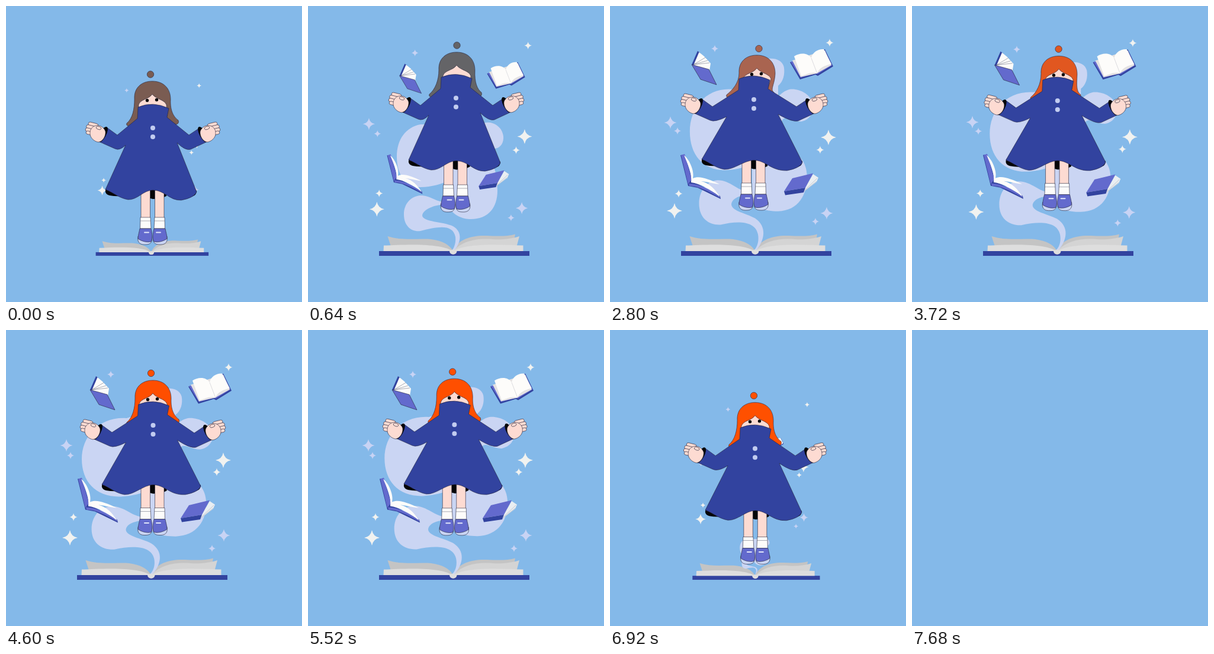
Write an HTML page that moves like this. It is 500 px wide and 500 px high and loops after 7720 ms.

```html
<!DOCTYPE html>
<html lang="en">
<head>
<meta charset="utf-8">
<title>Floating reader</title>
<style>
  html, body { margin: 0; width: 100%; height: 100%; overflow: hidden; background: #84b9e9; }
  svg { display: block; width: 100vw; height: 100vh; }
  .ink { stroke: #23233a; stroke-width: .6; stroke-linejoin: round; }
  .skin { fill: #fddbd2; }
  .lilac { fill: #cad5f3; }
  .navy { fill: #32439f; }
  .violet { fill: #636acd; }
  .white { fill: #fdfcfa; }
  .black { fill: #050507; }
  .line { fill: none; stroke: #55586e; stroke-width: .5; }
</style>
</head>
<body>
<svg viewBox="0 0 500 500">
  <defs>
    <path id="star" d="M0 -1Q.16 -.16 1 0Q.16 .16 0 1Q-.16 .16 -1 0Q-.16 -.16 0 -1Z"/>
    <g id="hand">
      <ellipse class="black" cx="163.5" cy="217" rx="5.5" ry="14.5" transform="rotate(28 163.5 217)"/>
      <g class="skin ink">
        <rect x="139" y="197.5" width="17" height="6" rx="3" transform="rotate(14 148 200)"/>
        <rect x="135.5" y="202" width="17" height="6" rx="3" transform="rotate(14 144 205)"/>
        <rect x="134" y="207" width="17" height="6" rx="3" transform="rotate(14 142 210)"/>
        <rect x="135" y="212" width="15" height="5.5" rx="2.7" transform="rotate(14 142 215)"/>
        <path d="M149 203C157 199 166 205 168 212C169 220 163 229 156 230C149 229 141 222 142 214C142 209 145 205 149 203Z"/>
        <ellipse cx="156.5" cy="206" rx="4.5" ry="2.6" transform="rotate(20 156.5 206)"/>
      </g>
    </g>
    <g id="leg">
      <rect class="skin ink" x="228" y="285" width="15.5" height="75"/>
      <path class="white ink" d="M227 357H244L245 376H226.500Z"/>
      <path class="line" d="M227 363H244.500"/>
      <path class="lilac ink" d="M223 389C221 401 228 403.500 236 403C244 403 248 399 246 389Z"/>
      <path class="violet ink" d="M226 376H245C247 385 248 393 245 398C238 400 228 397 223 393C223 387 225 382 226 376Z"/>
      <rect x="233" y="381.500" width="9" height="2" rx="1" fill="#e3e7fb"/>
    </g>
  </defs>

  <g id="scene">
    <g id="tome">
      <rect class="navy" x="120" y="414" width="254" height="8"/>
      <path fill="#c4c4c4" d="M134.500 389C160 397 186 392 208 394C228 397 239 403 245 414L140 406Z"/>
      <path fill="#c4c4c4" d="M245 413C254 394 276 387 302 388C322 389 338 389 350 385.500L347 402Z"/>
      <path fill="#d4d4d4" d="M245 414C262 396 286 392 312 394C330 395 345 393 357 389L352 408Z"/>
      <path fill="#dedede" d="M128 404.500C165 403 222 400 245 414H127.500ZM245 414C268 400 325 403 363.500 404.500V414Z"/>
    </g>
    <path id="smoke" class="lilac"/>
    <path id="spine" fill="#dedede" d="M239 414Q245 409 251.500 414C251 421.500 239.500 421.500 239 414Z"/>
    <g id="stars"></g>
    <g id="books">
      <g>
        <path class="navy" d="M142 101L152 78L156 81L147 104Z"/>
        <path class="white" d="M145 102L154.500 80L163 87L174 99L172 111Z"/>
        <path class="line" d="M145 101L165 89M145 101L169 94M145 101L172 98"/>
        <path class="violet ink" d="M142 101L171 109L184 135L157 126Z"/>
      </g>
      <g>
        <path class="navy" d="M310 97L327 126L353 118L357 120L383 104L369 75L350 90Z"/>
        <path class="violet" d="M311 96L328 123L353 116L357 117L381 102L369 77L350 90Z"/>
        <path fill="#e4e2e2" d="M314 94L328 122L355 116L380 102L369 77Z"/>
        <path class="white" d="M317 87C327 80 341 81 346 90L356 116C346 112 338 118 329 120ZM346 90C348 79 359 74 367 75L380 100C370 102 359 106 356 116Z"/>
        <path class="line" d="M346 90L356 116" opacity=".4"/>
      </g>
      <g>
        <path class="navy" d="M118 254L131 306L147 309L186 328L185 323L139 298L125 253Z"/>
        <path class="violet" d="M119 254L125 252L137 295L131 303Z"/>
        <path class="white" d="M124 254C134 262 142 282 139 293C150 288 165 294 184 303C172 302 160 298 153 298C167 301 177 312 185 325C168 310 150 302 136 300C138 286 130 268 124 254Z"/>
        <path class="violet" d="M132 302C150 302 168 312 184 324L185 326C165 315 149 306 133 306Z"/>
      </g>
      <g>
        <path fill="#e9eef2" d="M329 308L343 284L352 290L349 297L327 314Z"/>
        <path class="line" d="M329 311L350 291M328 313L349 296" opacity=".5"/>
        <path class="violet" d="M294 313L308 291L343 282.500L330 307Z"/>
        <path class="navy" d="M294 313L330 307L327 315L296 319.500Z"/>
      </g>
    </g>

    <circle id="bun" class="ink" cx="244" cy="115.500" r="5.700"/>
    <path id="hair" class="ink"/>
    <path id="face" class="skin ink"/>
    <g id="eyes" class="black"><ellipse cx="238.500" cy="159.500" rx="2.700" ry="2.700"/><ellipse cx="254.500" cy="158.500" rx="2.700" ry="2.700"/></g>
    <path id="lining" class="black"/>
    <g id="legs"><use href="#leg"/><use href="#leg" transform="matrix(-1 0 0 1 495 0)"/></g>
    <path id="coat" class="navy ink"/>
    <g id="buttons" fill="#c2ccf0"><circle cx="248" cy="206" r="4"/><circle cx="248" cy="221" r="4"/></g>
    <use id="handL" href="#hand"/>
    <g id="handR"><use href="#hand" transform="matrix(-1 0 0 1 496 0)"/></g>
  </g>
</svg>

<script>
const LOOP = 7720, STEP = 40, END = 7680;
const $ = id => document.getElementById(id);
const TIMES = [0, 640, 1600, 2800, 4600, 5700, 6320, 7240, 7640];

// Offsets at each of TIMES: x list, y list.
const anchors = {
  t: [[0, 2, 1.5, -5, .5, -1, -3, -3, -3], [0, -50.5, -55, -48, -45, -46, -21.5, 4, 26]],
  a: [[0, 2, -2, -15, -9, -8, -9, -10, -10], [0, -50, -55, -48, -45, -46, -21, 4, 26]],
  b: [[0, 3, 6, 6, 9, 8, 4, 4, 4], [0, -50, -55, -48, -44, -46, -21, 4, 26]],
  l: [[0, 2, -2, -13, -6, -6, -7, -7, -7], [0, -50, -54, -51, -49, -50, -22, 4, 26]],
  r: [[0, 3, 5, 3, 7, 6, 2, 2, 2], [0, -49, -53, -50, -50, -50, -23, 4, 26]],
  f: [[0, 1.5, 1, -5, 0, -1, -2.5, -2, -2], [0, -55, -55.5, -58, -56.5, -56, -25, 3, 26]],
  h: [[0, 4, 6, 1, 1, 0, -2, -2, -2], [0, -49, -52, -44, -42, -45, -18.5, 4, 26]],
  n: [[0, 7.5, 12.5, 7.5, 1, 0, -1, -1, -1], [0, -49, -52, -43.5, -42.5, -45, -18.5, 4, 26]],
  p: [[0, 1, 0, -7, 0, -1, -3, -3, -3], [0, -49, -56, -48, -42, -45, -18, 4, 26]],
  q: [[0, 2, -2, -14, 1, 0, -2, -2, -2], [0, -47, -55, -47, -42, -45, -19, 4, 26]]
};

const tracks = {
  tome: [.75, 1, 1, 1, 1, 1, .92, .8, .7],
  stars: [.615, .96, 1, 1, 1, 1, .78, .62, .55],
  books: [.2, .88, 1, 1, 1, 1, .69, .2, .1],
  grow: [0, 1, 1, 1, 1, 1, 1, 0, 0],
  morph: [0, 0, 1, 1, 1, 1, 0, 0, 0],
  wide: [1, 1, 1, .975, 1.035, 1.02, 1, 1, 1],
  tall: [1, 1, 1, .99, .96, .97, 1, 1, 1]
};

const hairKeys = [[122, 92, 82], [100, 100, 103], [102, 106, 108], [169, 100, 80],
  [255, 78, 0], [255, 79, 0], [255, 80, 0], [255, 80, 0], [255, 80, 0]];

// Each moving item: positions at 1600, 2800 and 4600 ms.
const starRows = [
  [0, 13, 371, 219, 369, 222, 367, 220], [0, 6.5, 356, 243, 355, 243, 356, 240],
  [0, 6.5, 377, 59, 371, 62, 376, 63], [1, 6, 178, 72, 177, 72, 177, 75],
  [1, 10.5, 97, 197, 102, 197, 102, 195], [1, 6, 112, 214, 114, 211, 109, 212],
  [0, 6.5, 115, 319, 116, 317, 114, 316], [0, 13, 111, 347, 109, 346, 108, 351],
  [1, 10.5, 366, 345, 366, 350, 368, 347], [1, 6, 347, 362, 347, 364, 348, 369]
];
const bookRows = [
  [0, 0, -4, -2, 0, 0], [0, 0, -6, -2, -2, -1.5],
  [0, 0, 1, -2, 3, -2.5], [0, 0, 0, 0, 1, 5]
];

const smokeLow = `M247 413C258 400 262 382 245 372C228 364 194 365 193 354
C194 343 215 335 235 335C245 355 262 360 275 360C305 360 320 340 320 312
C320 288 316 268 305 262L295 235C304 233 303 241 315 241C326 240 331 230 330 220
C328 203 312 195 300 197C296 198 292 200 285 200L275 200C274 200 272 200 270 200
C268 200 266 200 262 200L230 200L190 200C165 205 150 225 150 255
C150 285 165 306 190 306C210 306 225 300 240 295L240 330C218 335 210 320 190 320
C175 321 162 333 162 352C162 372 175 382 190 380C220 372 245 368 249 390C250 398 248 406 244 412Z`;
const smokeHigh = `M247 413C262 395 266 372 245 358C228 349 206 346 204 335
C204 324 220 318 235 318C240 340 262 346 285 346C320 345 336 318 335 285
C334 262 322 250 305 240L290 195C296 178 306 192 325 193C340 190 347 178 346 165
C342 145 320 136 305 138C296 140 290 146 285 150L285 132C294 125 297 112 295 100
C292 88 280 84 265 86L230 130L205 138C160 135 132 170 132 210
C132 250 155 277 195 276C215 275 230 270 240 265L240 312C215 315 205 293 180 293
C160 295 148 312 148 333C148 358 165 370 185 369C215 362 245 362 250 385C252 395 250 405 244 412Z`;
const highNums = smokeHigh.match(/[\d.]+/g).map(Number);

// A letter after a point names the anchor it follows.
const shapes = {
  coat: `M223,171t Q248,160t 275,173t L272,188t L309,218b L327,206b L340,229b L312,242b
    Q303,245b 289,231t L322,314r Q318,324r 296,328r C276,329c 268,311c 248,311c
    C232,311c 222,328l 206,327l C190,324l 185,317l 168,310l L202,235t Q192,245a 184,241a
    L157,229a L170,205a L188,218a L222,190t Z`,
  lining: `M169,308l Q165,317l 175,320l Q185,322l 196,321l L190,308l Z
    M322,312r Q322,324r 304,322r L308,308r Z
    M232,306c L272,306c L271,321c Q262,326c 248,326c L232,322c Z`,
  hair: `M217,157h C216,138h 229,127h 247,127h C266,127h 278,139h 278,158h
    C277,178h 284,188q 291,193q Q293,199q 287,200q L270,190h L224,188h
    C220,196p 214,203p 208,203p Q202,202p 204,198p C214,190p 217,174h 217,157h Z`,
  face: `M247,149h C241,158h 227,157h 224,167h L224,186t L272,186t L271,167h
    C268,158h 254,158h 247,149h Z`
};

// Monotone cubic through the key values.
function curve(xs, ys, t) {
  const last = xs.length - 1;
  if (t <= xs[0]) return ys[0];
  if (t >= xs[last]) return ys[last];
  let i = 0;
  while (t >= xs[i + 1]) i++;
  const rate = k => (ys[k + 1] - ys[k]) / (xs[k + 1] - xs[k]);
  const slope = k => {
    if (k === 0) return rate(0);
    if (k === last) return rate(last - 1);
    const a = rate(k - 1), b = rate(k);
    return a * b <= 0 ? 0 : 2 * a * b / (a + b);
  };
  const w = xs[i + 1] - xs[i], u = (t - xs[i]) / w, v = 1 - u;
  return ys[i] * (1 + 2 * u) * v * v + ys[i + 1] * u * u * (3 - 2 * u)
    + w * u * v * (slope(i) * v - slope(i + 1) * u);
}
const at = (ys, t) => curve(TIMES, ys, t);
const drift = ([x1, y1, x2, y2, x3, y3], t) => [[x1, x2, x3], [y1, y2, y3]]
  .map(v => curve([1600, 2800, 4600], v, t));
const move = (id, [x, y]) => $(id).setAttribute('transform', `translate(${x} ${y})`);
const zoom = (id, x, y, s) =>
  $(id).setAttribute('transform', `translate(${x} ${y}) scale(${s}) translate(${-x} ${-y})`);

$('stars').innerHTML = starRows.map(([tint]) =>
  `<use href="#star" fill="${tint ? '#c8d3f4' : '#f1f2f0'}"/>`).join('');

function smokePath(v) {
  let i = 0;
  return smokeLow.replace(/[\d.]+/g, s => {
    const p = +s + (highNums[i] - s) * v.morph;
    return i++ % 2 ? 412 + (p - 412) * v.grow * v.tall : 246 + (p - 246) * v.grow * v.wide;
  });
}

function draw(t) {
  $('scene').style.display = t >= END ? 'none' : '';
  const v = {}, pose = {};
  for (const k in tracks) v[k] = at(tracks[k], t);
  for (const k in anchors) pose[k] = anchors[k].map(ys => at(ys, t));
  pose.c = [0, 1].map(i => (pose.l[i] + pose.r[i]) / 2);

  zoom('tome', 246.5, 421.5, v.tome);
  zoom('spine', 246.5, 421.5, v.tome);
  zoom('stars', 245, 255, v.stars);
  zoom('books', 247, 240, v.books);
  $('smoke').setAttribute('d', smokePath(v));

  starRows.forEach(([, r, ...path], i) => {
    const [x, y] = drift(path, t);
    $('stars').children[i].setAttribute('transform', `translate(${x} ${y}) scale(${r})`);
  });
  bookRows.forEach((path, i) =>
    $('books').children[i].setAttribute('transform', `translate(${drift(path, t)})`));

  for (const id in shapes) {
    $(id).setAttribute('d', shapes[id].replace(/([\d.]+),([\d.]+)([a-z])/g,
      (_, x, y, k) => `${+x + pose[k][0]} ${+y + pose[k][1]}`));
  }
  move('bun', pose.n);
  move('eyes', pose.h);
  move('legs', pose.f);
  move('buttons', pose.t);
  move('handL', pose.a);
  move('handR', pose.b);

  $('eyes').style.display = Math.abs(t - 640) < 100 ? 'none' : '';
  const color = `rgb(${[0, 1, 2].map(c => Math.round(at(hairKeys.map(k => k[c]), t)))})`;
  $('hair').setAttribute('fill', color);
  $('bun').setAttribute('fill', color);
}

const start = performance.now();
function tick() {
  const t = (performance.now() - start) % LOOP;
  draw(Math.floor(t / STEP) * STEP);
  requestAnimationFrame(tick);
}
tick();
</script>
</body>
</html>
```
